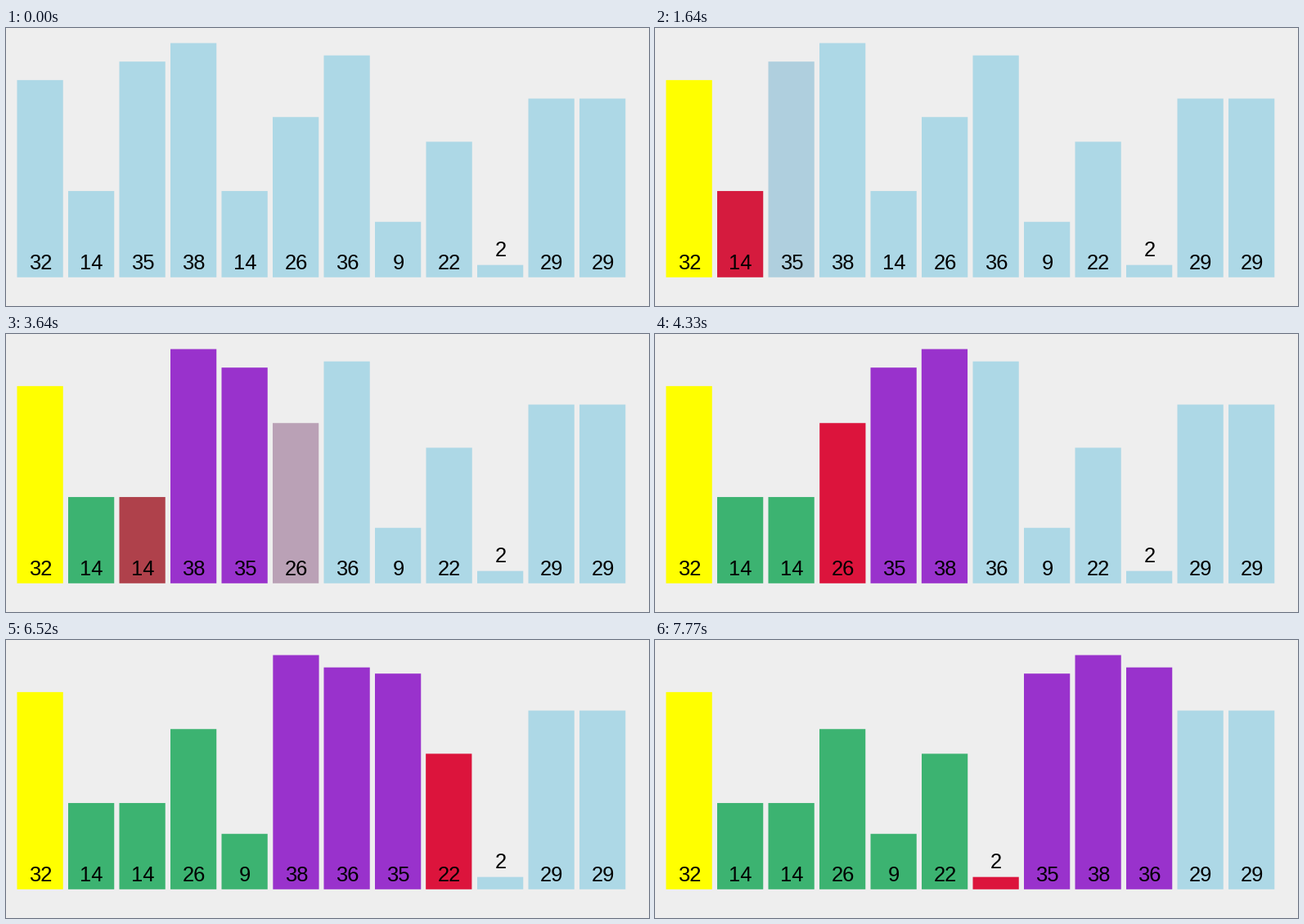
Animation of 786x341 px, one loop 8 s. Source, as a matplotlib script:

```python
import math

import numpy as np
import matplotlib.pyplot as plt
from matplotlib.animation import FuncAnimation
from matplotlib.colors import to_rgb
from matplotlib.patches import Rectangle

W, H, DPI = 786, 341, 100
LOOP, INTERVAL = 8000, 20
LEFT, PITCH, BAR_W = 13.5, 62.5, 56.25
BASE, UNIT = 305.8, 7.56

# Steps of the sort start evenly; the picture is redrawn on a coarser clock (ms)
STEP_START, STEP_MS, EASE_MS = 79, 493.8, 250
TICK_START, TICK_MS = 138, 77.8

VALUES = [32, 14, 35, 38, 14, 26, 36, 9, 22, 2, 29, 29]
IDLE, PIVOT, CURRENT, SMALL, LARGE = map(
    to_rgb, ["lightblue", "yellow", "crimson", "mediumseagreen", "darkorchid"])


def partition_states():
    """Slots and colours of all bars after each step of the partition."""
    order = list(range(len(VALUES)))
    colours = [IDLE] * len(VALUES)
    states = []

    def record():
        states.append((np.argsort(order).astype(float), np.array(colours)))

    record()
    colours[0] = PIVOT
    record()
    store = 0
    for i in range(1, 10):
        bar = order[i]
        colours[bar] = CURRENT
        record()
        if VALUES[bar] < VALUES[0]:
            store += 1
            order[i], order[store] = order[store], order[i]
            record()
            colours[bar] = SMALL
        else:
            colours[bar] = LARGE
    return states


def ease(t):
    t = min(max(t, 0), 1)
    return 4 * t**3 if t < 0.5 else 1 - 4 * (1 - t)**3


STATES = partition_states()

fig = plt.figure(figsize=(W / DPI, H / DPI), dpi=DPI, facecolor="#eeeeee")
ax = fig.add_axes([0, 0, 1, 1])
ax.set_xlim(0, W)
ax.set_ylim(H, 0)
ax.axis("off")

bars, labels = [], []
for n, value in enumerate(VALUES):
    height = value * UNIT
    bars.append(ax.add_patch(Rectangle(
        (0, BASE - height), BAR_W, height, lw=0, snap=False, zorder=n + 1)))
    # A label that does not fit inside its bar sits above it
    baseline = 296 if height > 30 else 280
    labels.append(ax.text(
        0, baseline, str(value), ha="center", va="baseline", color="black",
        family="Liberation Sans", size=25.5 * 72 / DPI, zorder=n + 1.5))


def draw(frame):
    now = frame * INTERVAL + INTERVAL / 2
    tick = TICK_START + math.floor((now - TICK_START) / TICK_MS) * TICK_MS
    step, phase = divmod(max(tick - STEP_START, 0), STEP_MS)
    p = ease(phase / EASE_MS)
    (slots0, col0), (slots1, col1) = STATES[int(step):int(step) + 2]
    xs = LEFT + PITCH * (slots0 + (slots1 - slots0) * p)
    cols = col0 + (col1 - col0) * p
    for bar, label, x, col in zip(bars, labels, xs, cols):
        bar.set_x(x)
        bar.set_facecolor(tuple(col))
        label.set_x(x + BAR_W / 2 + 0.6)
    return bars + labels


anim = FuncAnimation(fig, draw, frames=LOOP // INTERVAL, interval=INTERVAL,
                     init_func=lambda: draw(0), repeat=True, repeat_delay=0)
plt.show()
```
